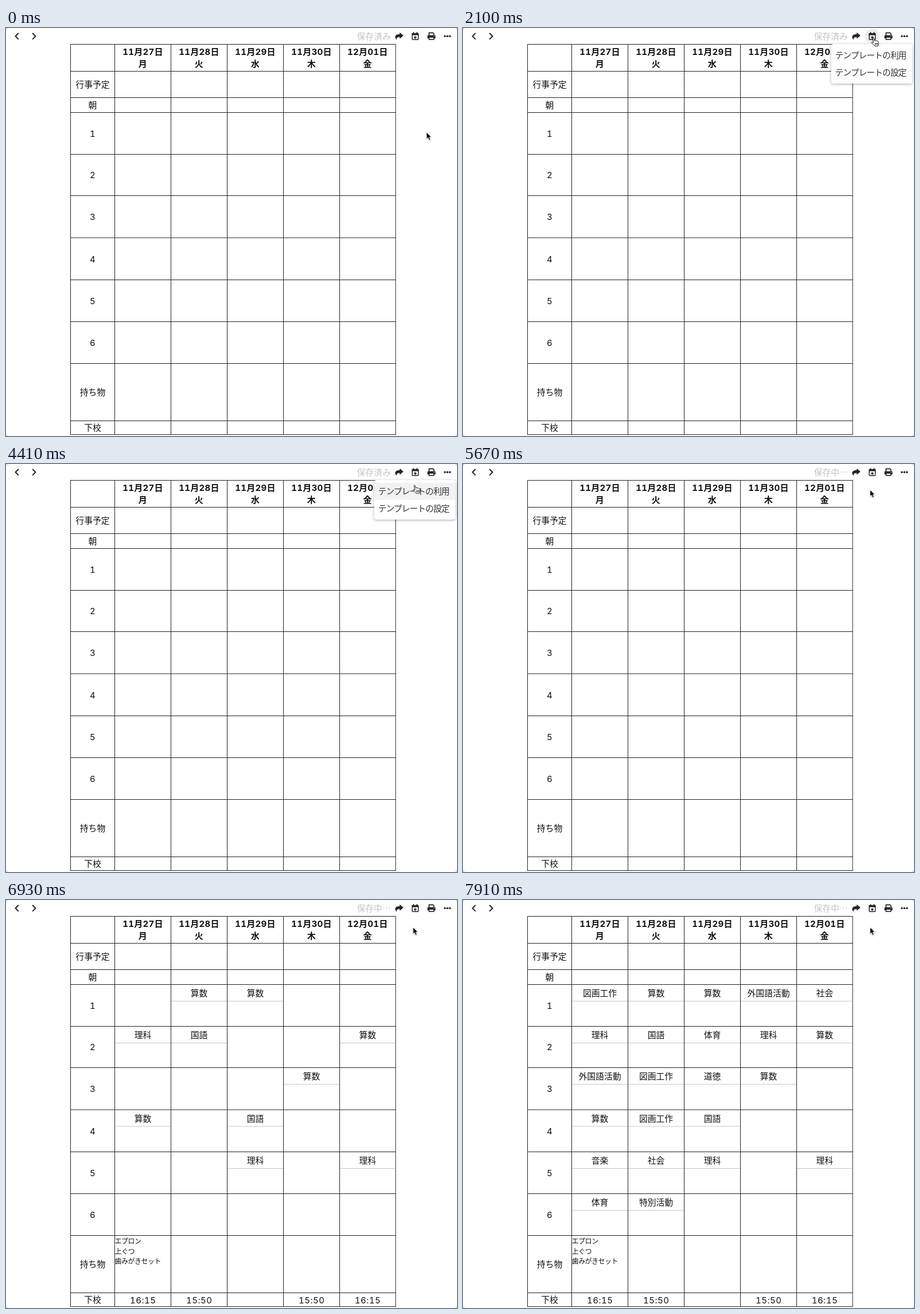
Animation, 786 px wide and 712 px high, one loop 8 s. Source, as an HTML page:

```html
<!DOCTYPE html>
<html lang="ja">
<head>
<meta charset="utf-8">
<title>週予定表</title>
<style>
  html, body { margin: 0; width: 100%; height: 100%; overflow: hidden; background: #fff; }
  svg { display: block; width: 100vw; height: 100vh; }
  text { font: 14.8px "Noto Sans CJK JP", sans-serif; fill: #111; }
  .mid { text-anchor: middle; }
  .head, .num { font-variant-numeric: tabular-nums; }
  .head { font: bold 15px "Inter", "Noto Sans CJK JP", sans-serif; font-variant-numeric: tabular-nums; letter-spacing: .25px; }
  .num { font: 15px "Inter", sans-serif; font-variant-numeric: tabular-nums; letter-spacing: .5px; }
  .item { font-size: 12px; letter-spacing: -.5px; }
  .status { fill: #c4c4c4; }
  .menu text { letter-spacing: -1px; fill: #333; }
  .panel { fill: #fff; filter: drop-shadow(0 1.5px 2px rgba(0, 0, 0, .35)); }
  .grid { stroke: #222; fill: none; }
  .rule { stroke: #c8c8c8; }
  .icon { fill: #222; }
  .line { fill: none; stroke: #222; stroke-width: 2; stroke-linecap: round; stroke-linejoin: round; }
</style>
</head>
<body>
<svg id="stage" viewBox="0 0 786 712" preserveAspectRatio="none">
  <rect width="786" height="712" fill="#d4d4d4"/>
  <rect width="786" height="712" rx="5" fill="#fff"/>
  <path class="line" d="M21.3 9.5 16.5 14.3 21.3 19.1M46.7 9.5 51.5 14.3 46.7 19.1"/>
  <circle id="iconHover" cx="713.3" cy="14.3" r="13" fill="#eee"/>
  <text id="status" class="status" x="611.5" y="20"></text>
  <path class="icon" d="M686.2 7.8 692.6 13.3 686.2 18.8V15.7C682.4 15.7 680.2 16.5 681 20.6 676.6 17.2 677 10.8 686.2 10.8Z"/>
  <g>
    <rect x="708" y="9.7" width="10.6" height="10.6" rx="1" fill="none" stroke="#222" stroke-width="1.5"/>
    <path class="icon" d="M707.5 9H719.2V12.6H707.5ZM709.4 7.2H711.3V10H709.4ZM715.3 7.2H717.2V10H715.3Z"/>
    <path d="M713.3 13.9V19.1M710.7 16.5H715.9" stroke="#222" stroke-width="1.5"/>
  </g>
  <g>
    <path class="icon" d="M736.5 12.2H746.5Q748.5 12.2 748.5 14.2V18H734.5V14.2Q734.5 12.2 736.5 12.2Z"/>
    <path d="M737.3 12.5V8.4H744.2L745.7 9.9V12.5" fill="#fff" stroke="#222" stroke-width="1.7"/>
    <rect x="737.3" y="16" width="8.4" height="4" fill="#fff" stroke="#222" stroke-width="1.6"/>
    <circle cx="746.4" cy="14.4" r=".7" fill="#fff"/>
  </g>
  <g class="icon">
    <circle cx="764.9" cy="14.3" r="1.75"/><circle cx="769.3" cy="14.3" r="1.75"/><circle cx="773.7" cy="14.3" r="1.75"/>
  </g>
  <g id="table"></g>
  <g id="menu" class="menu">
    <rect class="panel" x="641.5" y="28" width="142" height="69" rx="4"/>
    <rect id="itemHover" x="641.5" y="33" width="142" height="29.5" fill="#f2f2f2"/>
    <text x="648.5" y="53">テンプレートの利用</text>
    <text x="648.5" y="83">テンプレートの設定</text>
  </g>
  <g id="cursor">
    <path id="arrow" fill="#000" stroke="#fff" stroke-width=".8"
      style="filter:drop-shadow(0 1px 1px rgba(0,0,0,.3))"
      d="M0 0V11.6L2.6 9.2 4.5 13.6 6.6 12.7 4.8 8.4H8.2Z"/>
    <path id="hand" fill="#fff" stroke="#111" stroke-width="1" stroke-linejoin="round"
      transform="translate(-3.5 -.3)"
      d="M4.6 8.5 2.9 2.2C2.5.6 4.4.1 4.9 1.6L6.3 5.9C6.6 4.7 8.3 4.7 8.6 5.8 9.1 5 10.5 5.2 10.8 6.3 11.6 5.7 12.6 6.1 12.8 7.3L13 10.5C13 12 12.3 12.8 12.2 14.7H6.2C5.8 12.6 3.2 11.3 1.4 9.4.6 8.4 1.8 7.3 3 8.1L4.6 9.6M7.4 9.5V12.5M9.2 9.5V12.5M11 9.5V12.5"/>
  </g>
</svg>
<script>
const LOOP = 8000, STEP = 70;
const $ = id => document.getElementById(id);
const table = $("table");

const colX = [112.5, 189.5, 287.5, 385.5, 483.5, 581.5, 679];
const rowY = [28.5, 75.5, 121.5, 147.5, 220.5, 292.5, 366, 439.5, 512.5, 585.5, 685.5, 709.5];
const midX = c => (colX[c] + colX[c + 1]) / 2;
const midY = r => (rowY[r] + rowY[r + 1]) / 2;

function add(parent, tag, attrs, content) {
  const el = document.createElementNS("http://www.w3.org/2000/svg", tag);
  for (const k in attrs) el.setAttribute(k, attrs[k]);
  if (content) el.textContent = content;
  return parent.appendChild(el);
}

// Centred text on the given point
function label(parent, x, y, content, cls = "") {
  return add(parent, "text", { x, y: y + 5.6, class: "mid " + cls }, content);
}

const lines = colX.map(x => `M${x} 28V710`).concat(rowY.map(y => `M112 ${y}H679.5`));
add(table, "path", { class: "grid", d: lines.join("") });

["11月27日", "11月28日", "11月29日", "11月30日", "12月01日"].forEach((date, i) => {
  label(table, midX(i + 1), 41.4, date, "head");
  label(table, midX(i + 1), 62.4, "月火水木金"[i], "head");
});
["行事予定", "朝", "1", "2", "3", "4", "5", "6", "持ち物", "下校"].forEach((name, i) => {
  label(table, midX(0), midY(i + 1) + .2, name, /\d/.test(name) ? "num" : "");
});

// Parts that pop in: time and group
const pops = [];
function pop(at) {
  const g = add(table, "g", {});
  pops.push({ at, g });
  return g;
}

const items = pop(6090);
["エプロン", "上ぐつ", "歯みがきセット"].forEach((name, i) =>
  add(items, "text", { class: "item", x: 189.6, y: 600.4 + i * 17.1 }, name));

[[6300, 1, "16:15"], [6300, 2, "15:50"], [6370, 4, "15:50"], [6370, 5, "16:15"]]
  .forEach(([at, c, time]) => label(pop(at), midX(c) + .2, 698, time, "num"));

// Time, period, day, subject
[
  [6440, 1, 2, "算数"], [6440, 4, 1, "算数"], [6510, 1, 3, "算数"],
  [6580, 3, 4, "算数"], [6580, 2, 5, "算数"], [6650, 2, 2, "国語"],
  [6720, 4, 3, "国語"], [6790, 2, 1, "理科"], [6930, 5, 3, "理科"],
  [6930, 5, 5, "理科"], [7000, 1, 1, "図画工作"], [7070, 3, 1, "外国語活動"],
  [7420, 5, 1, "音楽"], [7420, 5, 2, "社会"], [7490, 6, 1, "体育"],
  [7490, 6, 2, "特別活動"], [7630, 3, 2, "図画工作"], [7630, 4, 2, "図画工作"],
  [7700, 1, 4, "外国語活動"], [7770, 2, 3, "体育"], [7840, 3, 3, "道徳"],
  [7840, 2, 4, "理科"], [7910, 1, 5, "社会"]
].forEach(([at, period, c, name]) => {
  const g = pop(at), y = rowY[period + 2];
  label(g, midX(c), y + 15.2, name);
  add(g, "path", { class: "rule", d: `M${colX[c] + .5} ${y + 29}H${colX[c + 1] - .5}` });
});

const linear = p => p;
const easeOut = p => 1 - (1 - p) ** 1.8;
const easeInOut = p => p * p * (3 - 2 * p);

// Pointer moves: start, end, x, y, easing
const moves = [
  [140, 910, 722.5, 28, easeInOut],
  [1190, 1260, 722, 26, linear],
  [1330, 1470, 717.5, 25, linear],
  [1470, 1750, 714.5, 17, easeOut],
  [3500, 3570, 713.5, 16, linear],
  [3990, 4830, 711, 45, easeOut],
  [5600, 5670, 709.5, 45, linear],
  [6300, 6370, 709.5, 47.7, linear]
];
function pointer(t) {
  let x = 733, y = 182;
  for (const [from, to, toX, toY, ease] of moves) {
    if (t <= from) break;
    const p = ease(Math.min(1, (t - from) / (to - from)));
    x += (toX - x) * p;
    y += (toY - y) * p;
  }
  return { x, y };
}

const show = (el, on) => { el.style.display = on ? "" : "none"; };

function draw(ms) {
  const t = Math.floor(ms / STEP) * STEP;
  const { x, y } = pointer(t);
  const hand = t >= 1400 && t < 5670;
  $("cursor").setAttribute("transform", `translate(${x} ${y})`);
  show($("hand"), hand);
  show($("arrow"), !hand);
  show($("iconHover"), hand && y < 28);
  show($("menu"), t >= 2100 && t < 5670);
  show($("itemHover"), y > 33);
  $("status").textContent = t < 5670 ? "保存済み" : "保存中…";
  for (const { at, g } of pops) show(g, t >= at);
}

const began = performance.now();
function tick() {
  draw((performance.now() - began) % LOOP);
  requestAnimationFrame(tick);
}
tick();
</script>
</body>
</html>
```
